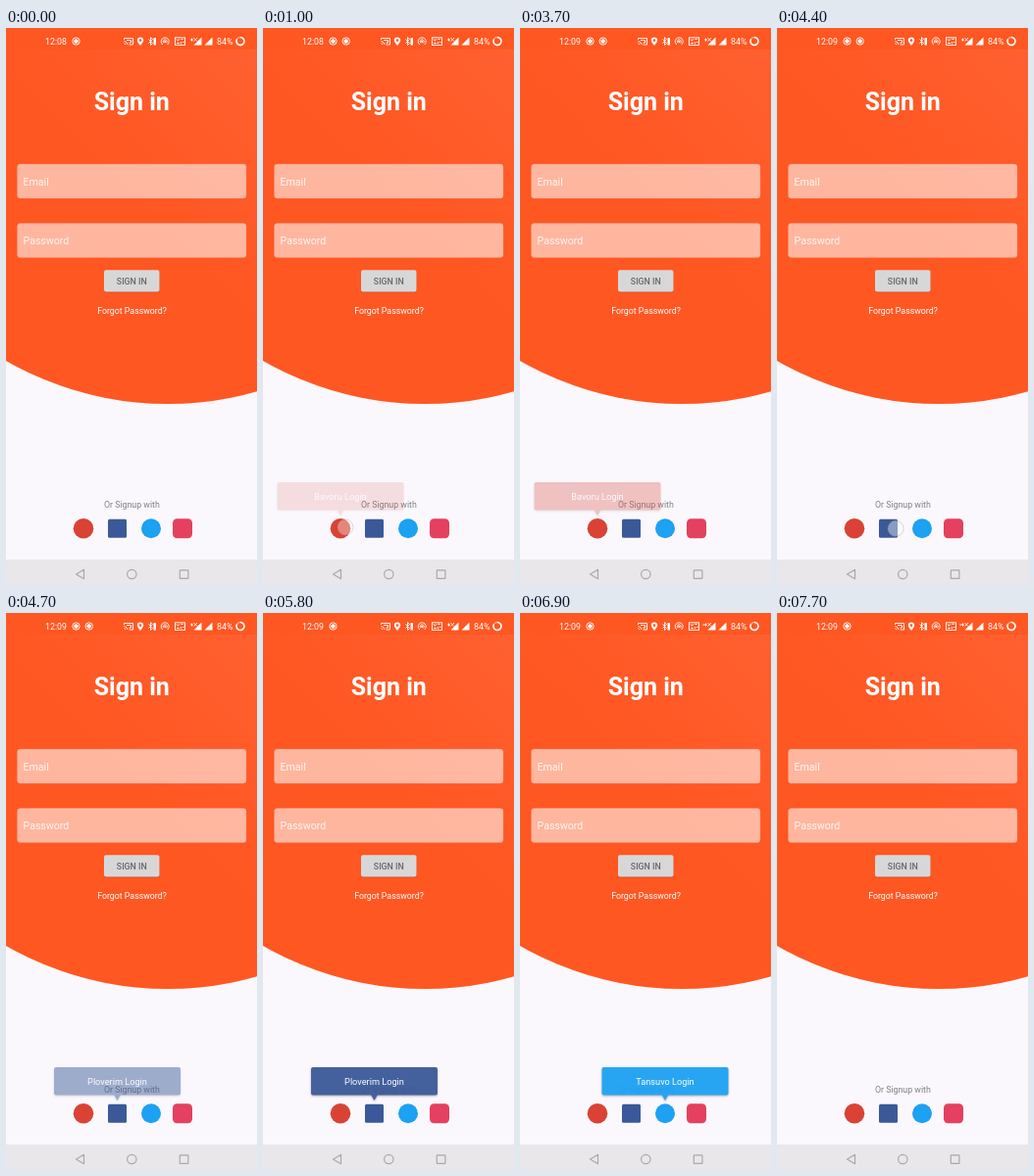
These frames come from a looping animation (256 px wide and 569 px high, 7.8 s). An HTML page:

```html
<!DOCTYPE html>
<html lang="en">
<head>
<meta charset="utf-8">
<title>Sign in</title>
<style>
  html, body { margin: 0; width: 100%; height: 100%; overflow: hidden; background: #faf8fc; }
  svg { display: block; width: 100%; height: 100%; font-family: Roboto, sans-serif; font-size: 8.8px; }
  .mid { text-anchor: middle; }
  .line { fill: none; stroke: #fff; stroke-width: .9; }
  .label { fill: #fff; font-size: 9.2px; text-anchor: middle; }
  .hint { fill: #fff; fill-opacity: .88; font-size: 10.6px; }
  .popup { filter: drop-shadow(0 1px 1px rgba(0,0,0,.32)); }
  .touch { fill: #fff; fill-opacity: .45; stroke: #8b8b94; stroke-opacity: .55; stroke-width: .7; }

  .popup, .touch, .timed { animation: 7800ms linear infinite both; }
  .timed { animation-timing-function: step-end; }

  #popup1 { animation-name: popup1; }
  #popup2 { animation-name: popup2; }
  #popup3 { animation-name: popup3; }
  #touch1 { animation-name: touch1; }
  #touch2 { animation-name: touch2; }
  #touch3 { animation-name: touch3; }
  #before { animation-name: before; }
  #after { animation-name: after; }
  #record { animation-name: record; }
  #data { animation-name: data; }

  @keyframes popup1 {
    0%, 11.54% { opacity: 0; }
    12.82% { opacity: .15; }
    16.67%, 44.87% { opacity: .95; }
    48.72%, 100% { opacity: 0; }
  }
  @keyframes popup2 {
    0%, 57.69% { opacity: 0; }
    62.82%, 75.64% { opacity: .95; }
    79.49%, 100% { opacity: 0; }
  }
  @keyframes popup3 {
    0%, 82.05% { opacity: 0; }
    87.18%, 93.59% { opacity: .95; }
    97.44%, 100% { opacity: 0; }
  }
  @keyframes touch1 {
    0%, 10.25% { opacity: 0; }
    10.26%, 12.82% { opacity: .8; }
    14.1%, 100% { opacity: 0; }
  }
  @keyframes touch2 {
    0%, 55.12% { opacity: 0; }
    55.13%, 56.5% { opacity: .9; }
    58.97%, 100% { opacity: 0; }
  }
  @keyframes touch3 {
    0%, 79.48% { opacity: 0; }
    79.49%, 81% { opacity: .9; }
    83.33%, 100% { opacity: 0; }
  }
  @keyframes before { 0% { opacity: 1; } 33.33%, 100% { opacity: 0; } }
  @keyframes after { 0% { opacity: 0; } 33.33%, 100% { opacity: 1; } }
  @keyframes record { 0% { opacity: 0; } 6.41% { opacity: 1; } 64.1%, 100% { opacity: 0; } }
  @keyframes data { 0% { opacity: 0; } 84.6%, 100% { opacity: 1; } }
</style>
</head>
<body>
<svg viewBox="0 0 256 569">
  <defs>
    <linearGradient id="glow" gradientUnits="userSpaceOnUse" x1="120" y1="158" x2="256" y2="22">
      <stop stop-color="#ff5722"/>
      <stop offset="1" stop-color="#ff6030"/>
    </linearGradient>
    <g id="dot">
      <circle class="line" r="3.7"/>
      <circle r="2.2" fill="#fff"/>
    </g>
    <g id="bubble">
      <rect x="-64.5" y="464" width="129" height="28.5" rx="2"/>
      <path d="M-3.5 492h7l-3.5 6z"/>
    </g>
  </defs>

  <rect width="256" height="569" fill="#faf8fc"/>
  <circle cx="165" cy="53" r="331" fill="url(#glow)"/>
  <rect width="256" height="22" fill="#ff5722"/>

  <!-- Status bar -->
  <g fill="#fff">
    <text id="before" class="timed" x="40" y="16.6">12:08</text>
    <text id="after" class="timed" x="40" y="16.6">12:09</text>
    <use href="#dot" x="71.5" y="13.5"/>
    <g id="record" class="timed"><use href="#dot" x="84.7" y="13.5"/></g>
    <path class="line" d="M120.5 12v-1.5h9v6.5h-4M120.5 13.5q3 .5 3.5 3.5M120.5 15.5l1.5 1.5M123 12.5h4.5v2.5h-2"/>
    <path fill-rule="evenodd" d="M137 18q-3.2-3.5-3.2-5.4a3.2 3.2 0 0 1 6.4 0q0 1.9-3.2 5.4zm0-6.7a1.3 1.3 0 1 0 0 2.6a1.3 1.3 0 1 0 0-2.6z"/>
    <path class="line" d="M145.5 11.5l4 4-2 2v-8l2 2-4 4"/>
    <rect x="150.5" y="10" width="2.5" height="7.5" rx=".6"/>
    <path class="line" d="M159.8 17a4 4 0 1 1 4.8 0M160.8 15.3a2 2 0 1 1 2.8 0"/>
    <circle cx="162.2" cy="14" r="1"/>
    <rect class="line" x="172.5" y="9.8" width="10" height="7.6"/>
    <path class="line" d="M174 11.3l1.3 2 1.3-2M178 11.3h3M174 15.5h3M178.5 14.2v2M180 14.5h1.5"/>
    <path class="line" stroke-width=".7" d="M189.5 10.5v3M188 12h3"/>
    <path id="data" class="line timed" d="M186.3 12h1.8"/>
    <path d="M199.5 9.5v8h-8z"/>
    <path class="line" d="M191.5 10l3.5 3.5M195 10l-3.5 3.5"/>
    <path d="M210.5 9.5v8h-8z"/>
    <text x="215" y="16.7" font-size="9">84%</text>
    <circle cx="239" cy="13.5" r="4" fill="none" stroke="#fff" stroke-opacity=".45" stroke-width="1.5"/>
    <path class="line" style="stroke-width:1.5" d="M239 9.5a4 4 0 1 1-3.4 1.9"/>
  </g>

  <!-- Form -->
  <text class="mid" x="128.3" y="84" font-size="25" font-weight="700" fill="#fff">Sign in</text>
  <g fill="#fff" fill-opacity=".57" stroke="#e9a08c" stroke-opacity=".6" stroke-width=".6">
    <rect x="11.5" y="139" width="233.5" height="35" rx="3"/>
    <rect x="11.5" y="199.5" width="233.5" height="35" rx="3"/>
  </g>
  <text class="hint" x="17.5" y="160.7">Email</text>
  <text class="hint" x="17.5" y="221.2">Password</text>
  <rect x="100" y="248" width="56.5" height="22.3" rx="2" fill="#9b4a30" opacity=".55"/>
  <rect x="100" y="247.3" width="56.5" height="22.2" rx="2" fill="#d8d7d8"/>
  <text class="mid" x="128.3" y="261.6" font-weight="500" fill="#686868">SIGN IN</text>
  <text class="mid" x="128.5" y="292" fill="#fff">Forgot Password?</text>
  <text class="mid" x="128.4" y="489.7" fill="#808083">Or Signup with</text>

  <!-- Sign-up options -->
  <circle cx="79" cy="511.3" r="10.3" fill="#d94235"/>
  <rect x="104" y="501.7" width="19" height="19" rx="1.5" fill="#3b5998"/>
  <circle cx="148" cy="511.3" r="10" fill="#1da1f2"/>
  <rect x="170" y="501.3" width="20" height="20" rx="4.5" fill="#e4405f"/>

  <circle id="touch1" class="touch" cx="84" cy="510" r="8"/>
  <circle id="touch2" class="touch" cx="121" cy="511.3" r="8"/>
  <circle id="touch3" class="touch" cx="152" cy="511.3" r="8"/>

  <g id="popup1" class="popup">
    <use href="#bubble" x="79" fill="#dd4b41"/>
    <text class="label" x="79" y="481.7">Bavoru Login</text>
  </g>
  <g id="popup2" class="popup">
    <use href="#bubble" x="113.5" fill="#3b5998"/>
    <text class="label" x="113.5" y="481.7">Ploverim Login</text>
  </g>
  <g id="popup3" class="popup">
    <use href="#bubble" x="148" fill="#1da1f2"/>
    <text class="label" x="148" y="481.7">Tansuvo Login</text>
  </g>

  <!-- Navigation bar -->
  <rect y="543" width="256" height="26" fill="#e9e7ea"/>
  <g fill="none" stroke="#aaa8ac" stroke-width="1.2">
    <path d="M79.5 553.3v9.4l-8-4.7z" stroke-linejoin="round"/>
    <circle cx="128.3" cy="558" r="4.7"/>
    <rect x="177.3" y="553.8" width="8.6" height="8.6" rx=".5"/>
  </g>
</svg>
</body>
</html>
```
